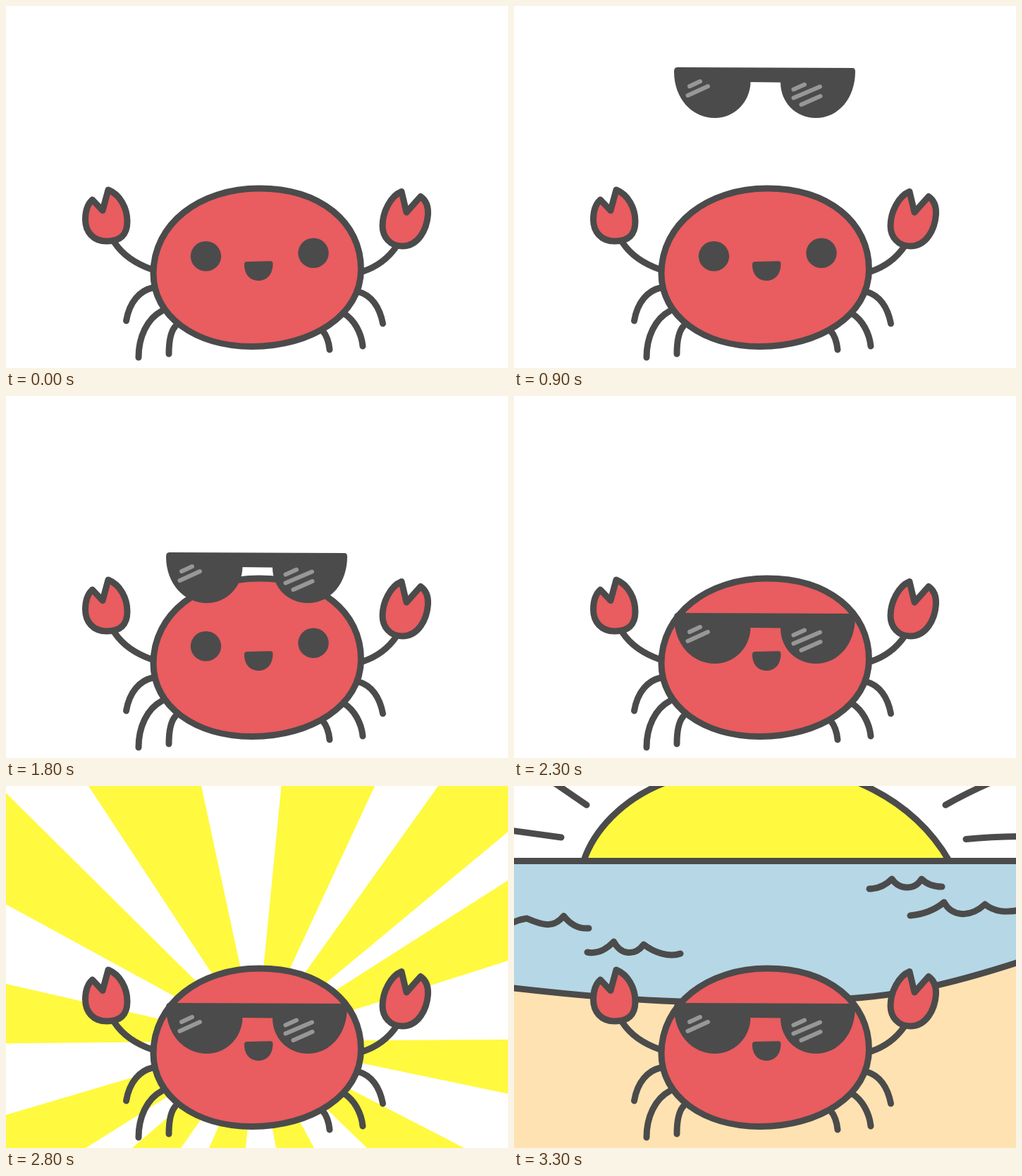
An HTML page that plays this animation: 712x514 px, repeating every 5.3 s.

```html
<!DOCTYPE html>
<html lang="en">
<head>
<meta charset="utf-8">
<title>Cool crab</title>
<style>
  html, body { margin: 0; width: 100%; height: 100%; overflow: hidden; background: #fff; }
  svg { display: block; width: 712px; height: 514px; }
  .ink { stroke: #4b4b4b; stroke-width: 9; stroke-linecap: round; stroke-linejoin: round; fill: none; }
  .red { fill: #e95c5f; }
  .dark { fill: #4b4b4b; }
  .yellow { fill: #fff93f; }
  .glint { stroke: #979797; stroke-width: 6; stroke-linecap: round; }

  #glasses { animation: drop 5300ms infinite; }
  #rays { opacity: 0; animation: flash 5300ms step-end infinite; }
  #beach { opacity: 0; animation: arrive 5300ms step-end infinite; }

  @keyframes drop {
    0% { transform: translateY(-100px); animation-timing-function: step-end; }
    1.886% { transform: translateY(-28px); animation-timing-function: steps(5, end); }
    11.32% { transform: translateY(44px); animation-timing-function: steps(3, end); }
    16.98% { transform: translateY(87px); animation-timing-function: steps(3, end); }
    22.64% { transform: translateY(126px); animation-timing-function: steps(6, end); }
    33.96% { transform: translateY(222px); animation-timing-function: steps(5, end); }
    43.395%, 100% { transform: translateY(308px); }
  }
  @keyframes flash {
    0%, 47.165%, 50.94%, 54.715%, 58.49%, 100% { opacity: 0; }
    45.28%, 49.055%, 52.828%, 56.6% { opacity: 1; }
  }
  @keyframes arrive {
    0% { opacity: 0; }
    62.26%, 100% { opacity: 1; }
  }
</style>
</head>
<body>
<svg viewBox="0 0 712 514">
  <path id="rays" class="yellow" d="M355 362L390.500 0H523Z M355 362L613 0H712V65Z M355 362L712 134V248Z
    M355 362L712 360V437Z M355 362L650 514H512Z M355 362L437 514H383Z M355 362L340 514H288Z
    M355 362L248 514H179Z M355 362L113 514H0V467Z M355 362L0 365.500V281Z M355 362L0 168V10Z M355 362L117 0H277Z"/>

  <g id="beach">
    <path class="ink" d="M52-8L103 27M-6 63L67 73M612 27Q640 11 676-5M641 75.500Q675 72 718 71.500"/>
    <path class="ink yellow" style="fill:#fff93f" d="M99 106C113 64 152 20 212-4C300-40 410-40 490-4C545 20 588 56 617 106"/>
    <path fill="#b6d7e5" d="M0 106H712V310H0Z"/>
    <path class="ink" style="fill:#ffe2b2" d="M-8 286C70 295 150 303 235 306C320 309 400 308 480 301.500C560 296 640 275 722 248V530H-8Z"/>
    <path class="ink" d="M-8 106.500H720"/>
    <path class="ink" d="M-6 196Q5 190 18 188C37 196 55 204 70.500 184.500C81 198 93 203 106 202
      M104 236C118 239 131 232 141.500 221C152 241 172 241 184 225C198 236 220 244 236 238
      M504 146C516 146 527 141 536 132C546 147 568 149 578 132C586 140 595 143 607 143
      M562 184C582 182 597 176 610 165C620 184 645 189 668 168C682 179 697 180 718 176"/>
  </g>

  <g id="crab">
    <path class="ink" d="M154 336C166 354 184 366 207 374M506 377C527 370 543 357 554 341
      M208 400C190 404 175 420 170.500 447M221 433C200 444 188 470 188 499M240 455C233 463 231 478 231 494
      M501 406C518 411 530 427 534.500 451M480 437C494 446 504 464 506 483M449 461C455 468 458 478 459 488"/>
    <g class="ink" style="fill:#e95c5f">
      <path d="M145 261C162 268 172 287 172 306C172 325 162 334 143 334C123 334 112.500 320 112.500 303C112.500 291 116 281 122.500 275L137 290.500Z"/>
      <path d="M561 263.500L568 293L588 270.500C596 276 599 286 598.500 296C597 317 585 341 562 341C545 341 534 328 534 312C534 293 545 270 561 263.500Z"/>
      <path d="M209 380C209 309 275 259 359 259C446 259 503.500 307 503.500 374C503.500 440 432 483.500 349 483.500C268 483.500 209 440 209 380Z"/>
    </g>
    <ellipse class="dark" cx="283.500" cy="355.300" rx="21.700" ry="21.300"/>
    <ellipse class="dark" cx="436" cy="350.800" rx="21.700" ry="21.300"/>
    <path class="dark" d="M342 363L375 362.300Q378.500 362.300 378.500 366C378.500 381 370 390 358.500 390C346 390 338 381 338 367Q338 363 342 363Z"/>
  </g>

  <g id="glasses">
    <path class="dark" d="M231.500 0L480 1Q484 1 484 6C484 43 461 72 428 72C400 72 378 50 378 21.500L335.500 21C335 49 313 72 285 72C253 72 227 45 227 6Q227 0 231.500 0Z"/>
    <path class="glint" d="M249 27L264 20M246.500 40L275 27M396.500 31.500L412 24.500M396.500 43.500L434 27.500M407.500 53L434.500 41"/>
  </g>
</svg>
</body>
</html>
```
